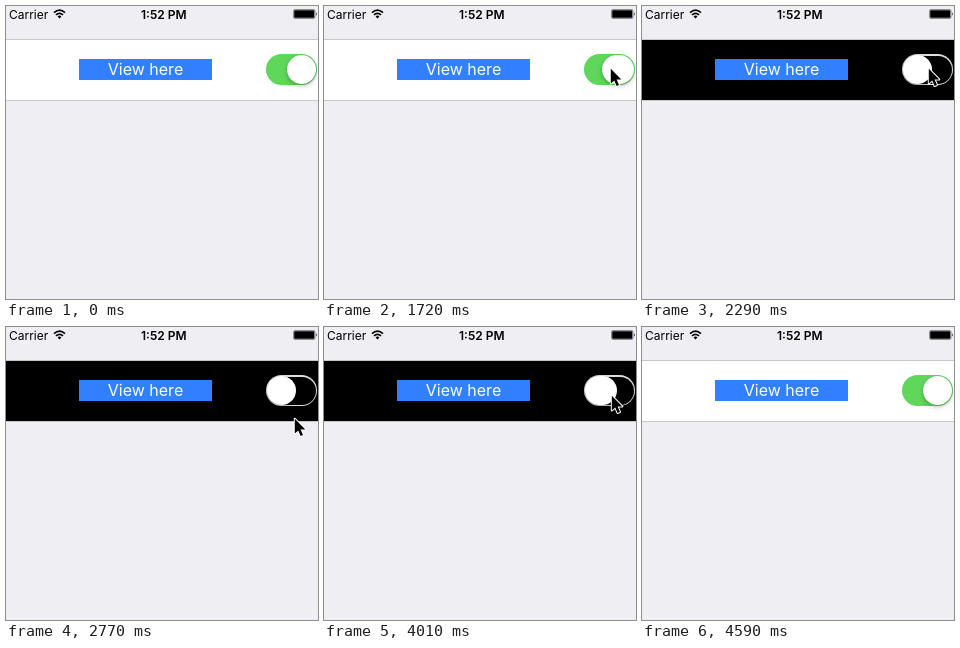
An HTML page for the animation above (5840 ms loop, 312 px wide and 293 px high).

```html
<!DOCTYPE html>
<html lang="en">
<head>
<meta charset="utf-8">
<title>Switch row</title>
<style>
  html, body { margin: 0; width: 100%; height: 100%; overflow: hidden; background: #eeeef3; }
  #stage { position: relative; width: 312px; height: 293px; overflow: hidden; background: #eeeef3; font-family: Inter, Roboto, sans-serif; }
  #stage > * { position: absolute; }
  svg { left: 0; top: 0; overflow: visible; }
  .status { top: 1px; font-size: 12px; line-height: 15px; white-space: pre; color: #000; }
  #row { left: 0; top: 34px; width: 312px; height: 60px; background: #fff; box-shadow: 0 -1px #c8c7cc, 0 1px #c8c7cc; }
  #label { left: 73px; top: 53px; width: 133px; height: 21px; background: #3080ff; color: #fff; font-size: 16px; line-height: 21px; text-align: center; }
  #track { left: 260px; top: 48px; width: 51px; height: 31px; border-radius: 15.5px; }
  #hole { left: 261.5px; top: 49.5px; width: 48px; height: 28px; border-radius: 14px; }
  #thumb { top: 49px; height: 29px; border-radius: 14.5px; background: #fff; box-shadow: 0 2px 4px rgba(0,0,0,.25), 0 0 1px rgba(0,0,0,.2); }
</style>
</head>
<body>
<div id="stage">
  <span class="status" style="left:3px">Carrier</span>
  <span class="status" style="left:135px;font-weight:600">1:52 PM</span>
  <svg width="312" height="20">
    <g fill="none" stroke="#000" stroke-width="1.7">
      <path d="M48 6.6Q53.5 1.6 59 6.6"/>
      <path d="M50 8.9Q53.5 5.8 57 8.9"/>
    </g>
    <path d="M51.6 10.4Q53.5 8.8 55.4 10.4L53.5 12.5Z"/>
    <rect x="287.5" y="3.5" width="21.5" height="9" rx="1.5" fill="none" stroke="#000" stroke-opacity=".6" stroke-width=".7"/>
    <rect x="288.2" y="4.2" width="20.1" height="7.6" rx=".8"/>
    <path d="M310 6.2Q311.6 8 310 9.8Z"/>
  </svg>
  <div id="row"></div>
  <div id="label">View here</div>
  <div id="track"></div>
  <div id="hole"></div>
  <div id="thumb"></div>
  <svg id="cursor" width="14" height="20">
    <path d="M.8 .8V15.6L4.2 12.4L6.6 18L9 17L6.6 11.5H11.3Z" stroke="#fff" stroke-width="2" stroke-linejoin="round" paint-order="stroke"/>
  </svg>
</div>
<script>
const LOOP = 5840;
const GREEN = [94, 215, 91], GREY = [222, 222, 222];
const $ = id => document.getElementById(id);
const row = $('row'), track = $('track'), hole = $('hole'), thumb = $('thumb'), cursor = $('cursor');

// Pointer moves: start time, step length, positions
const moves = [
  [1070, 60, [[307, 87], [299, 77], [292, 69], [288, 65], [286, 62]]],
  [2590, 57.5, [[286, 66], [287, 74], [287, 83], [288, 91], [288, 94]]],
  [3420, 60, [[288, 83], [288, 76], [287, 71], [287, 69], [287, 68]]]
];
// Switch presses: delay and flip are counted in steps
const presses = [
  { at: 1720, step: 57, on: false, delay: 1.5, flip: 2 },
  { at: 4010, step: 58, on: true, delay: 0.3, flip: 1 }
];

const clamp = x => Math.min(1, Math.max(0, x));
const smooth = x => { x = clamp(x); return x * x * (3 - 2 * x); };
const stepAt = (t, at, len, last) => Math.min(last, Math.floor((t - at) / len));

function drawCursor(t) {
  const shown = t >= 1070 && t < 4590;
  cursor.style.display = shown ? 'block' : 'none';
  if (!shown) return;
  const [at, len, pts] = moves.filter(m => t >= m[0]).pop();
  const [x, y] = pts[stepAt(t, at, len, pts.length - 1)];
  cursor.style.transform = `translate(${x}px, ${y}px)`;
}

function drawSwitch(t) {
  const press = presses.filter(p => t >= p.at).pop();
  let pos = 1, tint = 1, stretch = 0, lit = true;
  if (press) {
    const i = stepAt(t, press.at, press.step, 10);
    const toward = v => press.on ? v : 1 - v;
    pos = toward(smooth((i - press.delay) / 4.5));
    tint = toward(smooth((i - press.delay) / 3));
    stretch = 6 * clamp((i + 1) / 2) * (1 - smooth((i - 1.5) / 5));
    lit = i >= press.flip ? press.on : !press.on;
  }
  const width = 29 + stretch;
  const color = GREY.map((g, k) => Math.round(g + (GREEN[k] - g) * tint));
  row.style.background = hole.style.background = lit ? '#fff' : '#000';
  track.style.background = `rgb(${color})`;
  hole.style.transform = `scale(${1 - pos})`;
  thumb.style.width = width + 'px';
  thumb.style.left = 261 + (49 - width) * pos + 'px';
}

function draw() {
  const t = performance.now() % LOOP;
  drawCursor(t);
  drawSwitch(t);
  requestAnimationFrame(draw);
}
draw();
</script>
</body>
</html>
```
